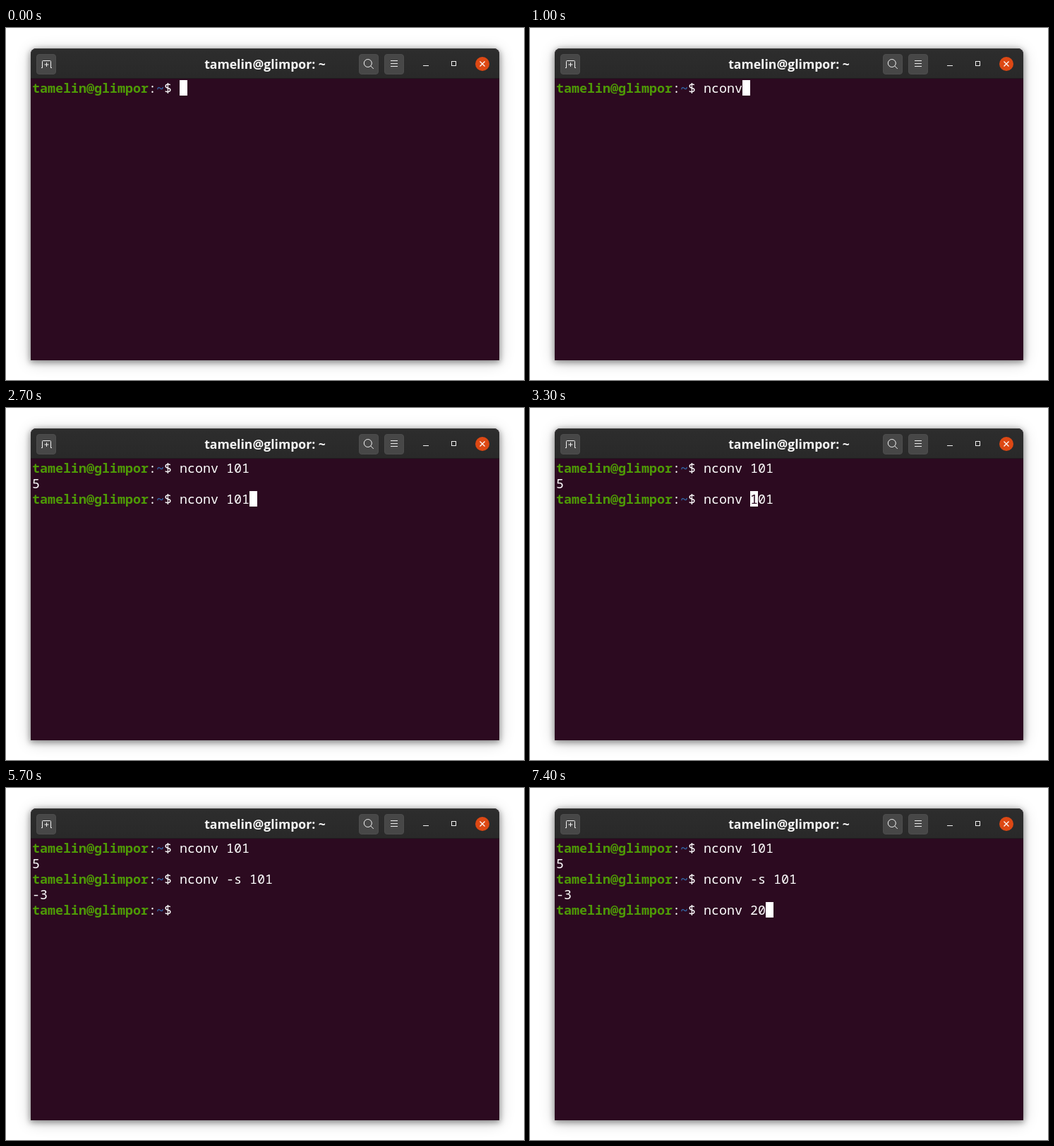
An HTML page for the animation above (8 s loop, 734x500 px).

```html
<!DOCTYPE html>
<html lang="en">
<head>
<meta charset="utf-8">
<title>Terminal</title>
<style>
  html, body { margin: 0; width: 100%; height: 100%; overflow: hidden; background: #fff; }
  .window {
    position: absolute; left: 35px; top: 29px; width: 664px; height: 443px;
    border-radius: 8px 8px 0 0; background: #2c0a20;
    box-shadow: 0 2px 8px 1px rgba(0,0,0,.4), 0 3px 22px rgba(0,0,0,.2);
  }
  .bar {
    box-sizing: border-box; height: 43px; border-radius: 8px 8px 0 0;
    background: linear-gradient(#2d2d2d, #292929);
    box-shadow: inset 0 1px #3d3d3d; border-bottom: 1px solid #1f1c1e;
  }
  svg { position: absolute; left: 0; top: 0; }
  .title {
    position: absolute; left: 0; top: 39px; width: 734px; text-align: center;
    font: 700 17.6px/24px "Open Sans", "Noto Sans", sans-serif; color: #f7f7f7;
  }
  #screen {
    position: absolute; left: 37px; top: 74px;
    font: 18.333px/22px "Noto Sans Mono", "DejaVu Sans Mono", monospace; color: #fff;
  }
  .row { position: relative; height: 22px; white-space: pre; }
  .user { color: #4e9a06; font-weight: 700; }
  .path { color: #3465a4; font-weight: 700; }
  .cursor {
    position: absolute; top: 0; width: 11px; height: 22px;
    background: #fff; color: #2c0a20;
  }
</style>
</head>
<body>
<div class="window"><div class="bar"></div></div>
<svg width="734" height="500" fill="none" stroke="#f2f2f2">
  <g fill="#474747" stroke="#4d4d4d">
    <rect x="43.5" y="37.5" width="27" height="28" rx="3.5"/>
    <rect x="500.5" y="37.5" width="27" height="28" rx="3.5"/>
    <rect x="536.5" y="37.5" width="27" height="28" rx="3.5"/>
  </g>
  <path d="M50 56.5h1.5v-9q0-1 1-1h10q1 0 1 1v9h1.5M57.5 49v6M54.5 52h6"/>
  <circle cx="512.8" cy="50" r="5.5"/>
  <path d="M516.8 54l4 4M545 46.5h10M545 50.5h10M545 54.5h10M591 53.5h8"/>
  <rect x="631.5" y="47.5" width="6" height="6"/>
  <circle cx="675" cy="51" r="10" fill="#dd4814" stroke="none"/>
  <path d="M671.5 47.5l7 7M678.5 47.5l-7 7" stroke="#fff" stroke-width="1.3"/>
</svg>
<div class="title">tamelin@glimpor: ~</div>
<div id="screen"></div>
<script>
const LOOP = 8000, CELL = 11, PROMPT_LEN = 19;
const HISTORY = [["nconv 101", "5"], ["nconv -s 101", "-3"]];
const OFF = -1;

// [time in ms, finished commands, typed text, cursor column (default: end of text)]
const STEPS = [
  [0, 0, ""],
  [200, 0, "", OFF],
  [400, 0, "n"],
  [500, 0, "nc"],
  [700, 0, "nco"],
  [900, 0, "ncon"],
  [1000, 0, "nconv"],
  [1200, 0, "nconv 1"],
  [1300, 0, "nconv 10"],
  [1500, 0, "nconv 101"],
  [1900, 0, "nconv 101", OFF],
  [2100, 0, "nconv 101"],
  [2400, 1, ""],
  [2700, 1, "nconv 101"],
  [2900, 1, "nconv 101", 8],
  [3300, 1, "nconv 101", 6],
  [3700, 1, "nconv -s101", 8],
  [3800, 1, "nconv -s 101", 9],
  [4400, 1, "nconv -s 101", OFF],
  [5000, 2, ""],
  [5700, 2, "", OFF],
  [6100, 2, ""],
  [6300, 2, "nconv -s 101"],
  [6400, 2, "nconv 101"],
  [6700, 2, "nconv 10"],
  [6900, 2, "nconv 1"],
  [7100, 2, "nconv "],
  [7300, 2, "nconv 2"],
  [7400, 2, "nconv 20"]
];

const screenEl = document.getElementById("screen");
const row = html => `<div class="row">${html}</div>`;
const prompt = text =>
  `<span class="user">tamelin@glimpor</span>:<span class="path">~</span>$ ${text}`;

function cursor(text, col) {
  if (col === OFF) return "";
  const left = (PROMPT_LEN + col) * CELL;
  return `<span class="cursor" style="left:${left}px">${text[col] || " "}</span>`;
}

function render([, done, text, col = text.length]) {
  const past = HISTORY.slice(0, done).map(([cmd, out]) => row(prompt(cmd)) + row(out));
  screenEl.innerHTML = past.join("") + row(prompt(text) + cursor(text, col));
}

let shown;
function tick() {
  const t = performance.now() % LOOP;
  const step = STEPS.findLast(s => s[0] <= t);
  if (step !== shown) render(shown = step);
  requestAnimationFrame(tick);
}
tick();
</script>
</body>
</html>
```
